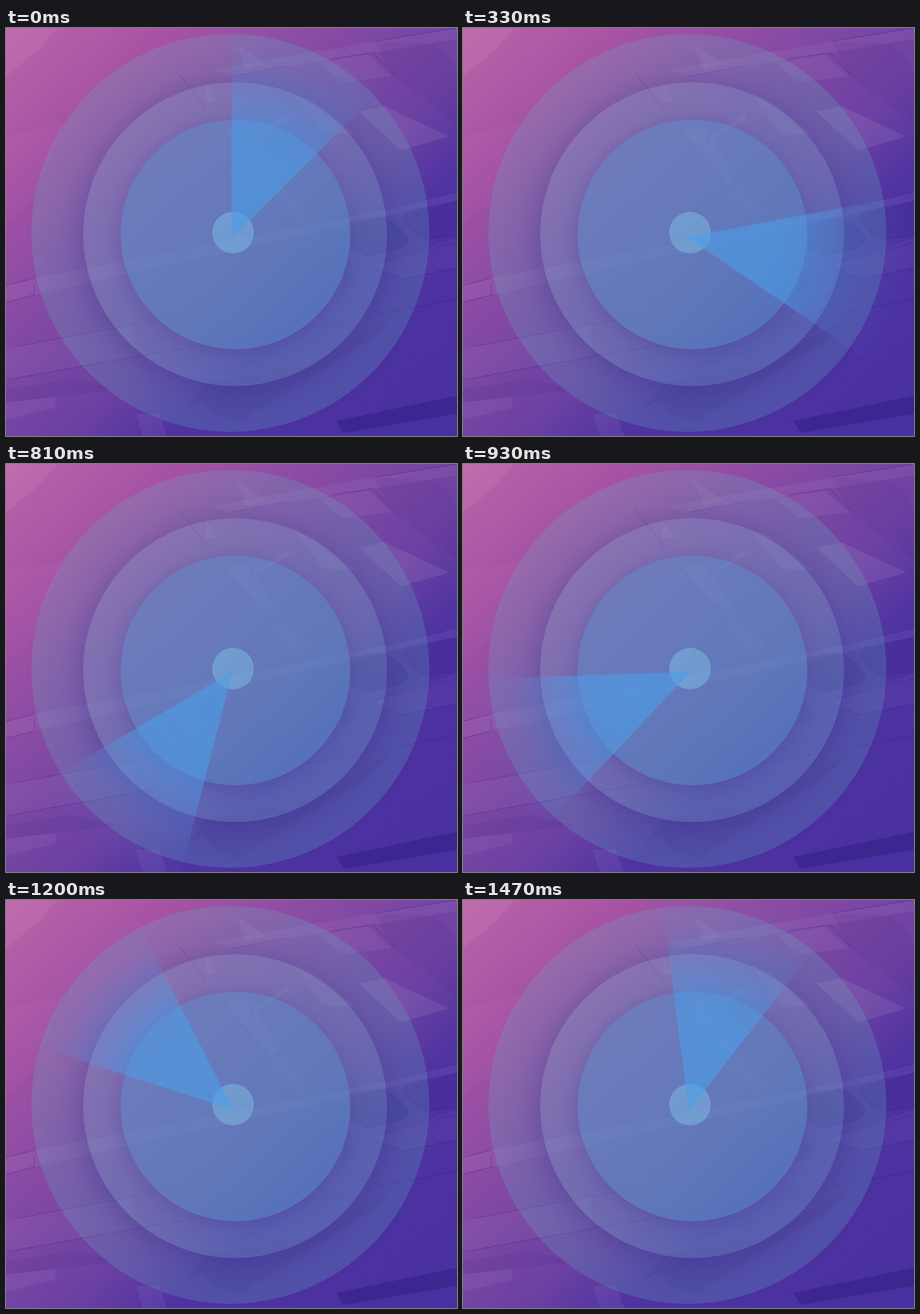
Write an HTML page that moves like this. It is 748 px wide and 677 px high and loops after 1500 ms.

```html
<!DOCTYPE html>
<html lang="en">
<head>
<meta charset="utf-8">
<title>Radar sweep</title>
<style>
  html, body { margin: 0; width: 100%; height: 100%; overflow: hidden; }
  .stage {
    position: relative; width: 748px; height: 677px; overflow: hidden;
    background: linear-gradient(to bottom right,
      #ba66a8, #a652a4 19%, #8d4ca4 33%, #7846a3 46%, #6a40a2 57%, #4e33a1 68%, #4930a0);
  }
  .stage > * { position: absolute; }
  svg { left: 0; top: 0; }
  .disc {
    left: calc(var(--x) * 1px); top: calc(var(--y) * 1px);
    width: calc(var(--r) * 2px); height: calc(var(--r) * 2px);
    margin: calc(var(--r) * -1px); border-radius: 50%;
  }
  .outer { --x: 372; --y: 340; --r: 330; background: rgba(100, 170, 190, .25); }
  .middle {
    --x: 380; --y: 342; --r: 252; background: rgba(125, 165, 205, .18);
    box-shadow: 0 10px 55px rgba(66, 38, 140, .5);
  }
  .inner {
    --x: 380.5; --y: 342.5; --r: 190.5; background: rgba(82, 138, 200, .42);
    box-shadow: 0 8px 36px rgba(66, 44, 145, .36);
  }
  .core { --x: 376.5; --y: 339.5; --r: 34.5; background: rgba(143, 230, 254, .3); }
  .light { fill: #fff; fill-opacity: .05; }
  .dark { fill: #21106c; fill-opacity: .2; }
  .line { fill: none; stroke: #32197c; stroke-opacity: .42; }
  .sweep {
    transform-origin: 374.5px 347px;
    animation: turn 1.5s steps(50, end) infinite;
  }
  @keyframes turn { to { transform: rotate(360deg); } }
</style>
</head>
<body>
<div class="stage">
  <svg width="748" height="677">
    <g class="light">
      <path d="M0 0H85L52 38L0 80Z"/>
      <path d="M0 178L96 160L42 290L0 325Z" fill-opacity=".02"/>
      <path d="M0 427L47 415L335 360L570 314L748 272V287L570 326L330 380L47 443L0 455Z"/>
      <path d="M20 528L212 490L215 545L0 584V533Z" fill-opacity=".03"/>
      <path d="M0 621L82 612V630L0 650Z"/>
      <path d="M214 640L254 638L268 677H226Z"/>
      <path d="M338 70L612 22L748 0V18L608 41L375 80Z"/>
      <path d="M380 25L432 60L400 70Z"/>
      <path d="M520 58L600 44L640 80L556 90Z"/>
      <path d="M585 138L628 130L735 180L655 203Z" fill-opacity=".08"/>
      <path d="M475 106L512 122L582 178L525 173Z"/>
      <path d="M333 95L350 122L330 124Z"/>
      <path d="M360 170L400 164L455 246L440 262Z"/>
      <path d="M408 174L466 140L470 150L415 186Z"/>
      <path d="M455 260L502 300L485 322L440 275Z" fill-opacity=".03"/>
      <path d="M612 395L748 348V397L660 416Z" fill-opacity=".03"/>
    </g>
    <g class="dark">
      <path d="M548 652L748 610V640L560 672Z" fill-opacity=".32"/>
      <path d="M570 322L625 313Q660 332 667 350Q662 366 642 369L600 378L572 368Z"/>
      <path d="M660 310L748 288V344L692 350Q664 336 660 310Z" fill-opacity=".12"/>
      <path d="M562 398L582 412L574 432L555 434Z" fill-opacity=".12"/>
      <path d="M0 600L110 582L190 600L0 622Z" fill-opacity=".08"/>
      <path d="M300 632L328 616L344 640L390 655L410 638L440 620L600 520L640 480L500 560L330 590Z" fill-opacity=".12"/>
      <path d="M612 22L700 26Q740 40 748 80V160L640 78Z" fill-opacity=".06"/>
    </g>
    <g class="line">
      <path d="M0 584L215 545L500 497L748 450"/>
      <path d="M20 528L212 492L330 470"/>
      <path d="M0 427L47 415M0 455L47 443V425"/>
      <path d="M375 80L470 62M540 51L608 41L642 76M612 22L748 0"/>
      <path d="M360 170L440 262M408 192V178L466 142M285 74L333 136"/>
      <path d="M570 322L625 313Q660 332 667 350Q662 366 642 369L600 378L572 368"/>
      <path d="M748 288L664 305Q656 313 666 326Q680 347 698 350L748 345"/>
      <path d="M748 356L622 388Q608 392 610 400L660 416L748 398M630 301L748 272"/>
      <path d="M214 640L254 638L268 677M214 640L226 677" stroke-opacity=".25"/>
    </g>
  </svg>
  <div class="disc outer"></div>
  <div class="disc middle"></div>
  <div class="disc inner"></div>
  <div class="disc core"></div>
  <svg width="748" height="677">
    <defs>
      <radialGradient id="beam" gradientUnits="userSpaceOnUse" cx="374.5" cy="347" r="370">
        <stop offset="0" stop-color="#4a9ee8" stop-opacity=".6"/>
        <stop offset=".4" stop-color="#4a9ee8" stop-opacity=".59"/>
        <stop offset=".52" stop-color="#4a9ee8" stop-opacity=".5"/>
        <stop offset=".68" stop-color="#4a9ee8" stop-opacity=".25"/>
        <stop offset=".81" stop-color="#4a9ee8" stop-opacity=".08"/>
        <stop offset="1" stop-color="#4a9ee8" stop-opacity="0"/>
      </radialGradient>
    </defs>
    <path class="sweep" fill="url(#beam)" d="M374 350V-30H754Z"/>
  </svg>
</div>
</body>
</html>
```
